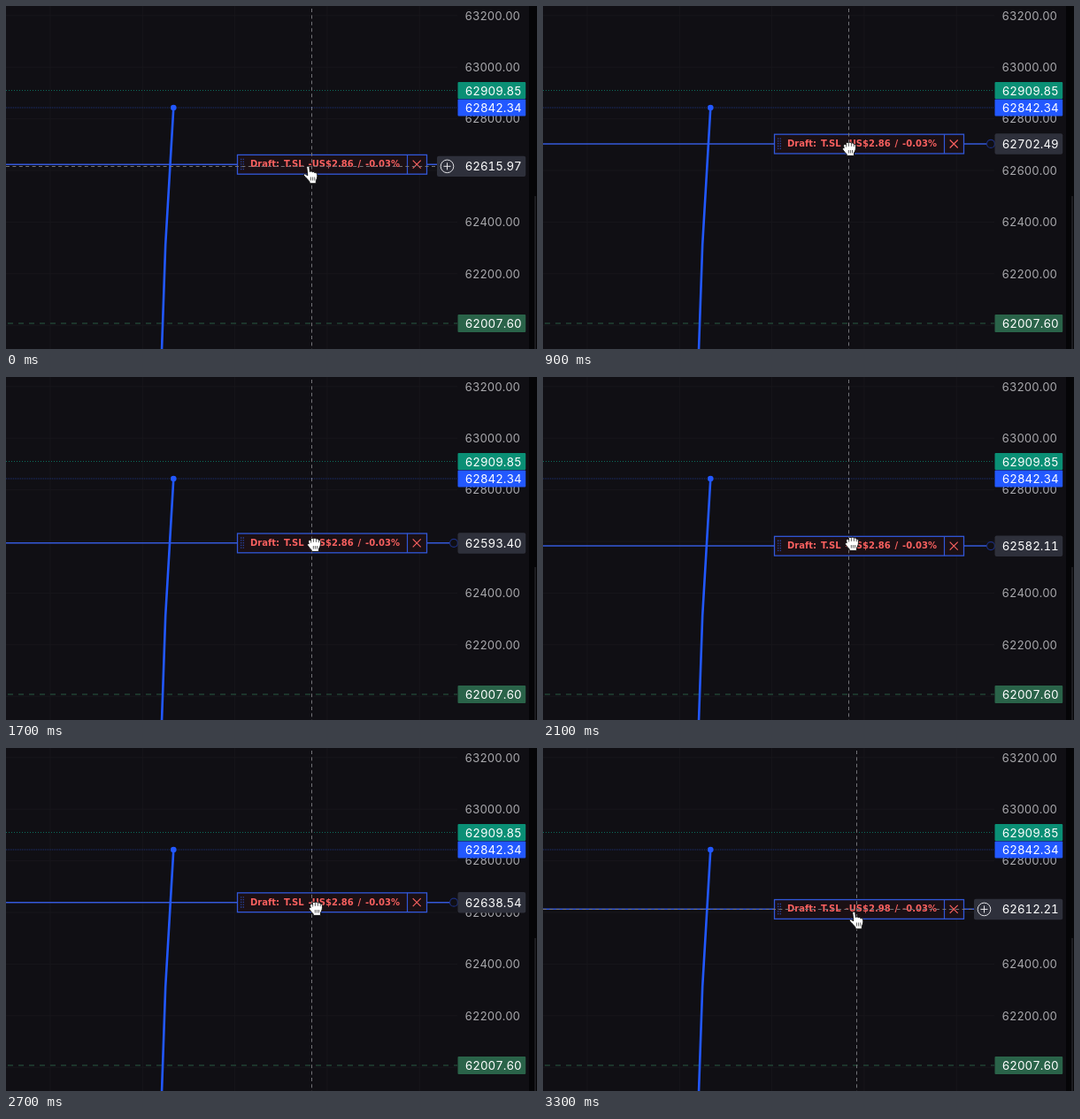
Recreate the animation shown at these times as an HTML page. Size 600x388 px, loop 3.4 s.

```html
<!DOCTYPE html>
<html lang="en">
<head>
<meta charset="utf-8">
<title>Dragging a draft stop order</title>
<style>
  html, body { margin: 0; width: 100%; height: 100%; overflow: hidden; background: #100f14; }
  svg { display: block; width: 600px; height: 388px; }
  text { font: 13.3px Inter, Roboto, sans-serif; font-variant-numeric: tabular-nums; text-anchor: middle; fill: #fff; }
  .tick { font-size: 13px; fill: #a9a9ad; }
  .grid { stroke: #17161b; }
  .order { font: bold 10px "DejaVu Sans", sans-serif; word-spacing: 1.4px; text-anchor: start; fill: #f8605f; }
  .cross { stroke: #737378; stroke-dasharray: 4 3.4; }
  .cursor { fill: #fff; stroke: #111; stroke-width: 1; stroke-linejoin: round; }
  .slits { fill: none; stroke: #333; stroke-width: .8; }
</style>
</head>
<body>
<svg viewBox="0 0 600 388">
  <rect width="600" height="388" fill="#100f14"/>
  <g id="scale"></g>

  <path d="M0 95.5H510" stroke="#0c6c5d" stroke-dasharray="1 2"/>
  <path d="M0 115H510" stroke="#1d327a" stroke-dasharray="1 1"/>
  <path d="M2 359H510" stroke="#285a42" stroke-dasharray="6 6"/>

  <g id="draft">
    <path d="M0 0H501" stroke="#3559da" stroke-width="1.5"/>
    <circle id="knob" cx="506" r="4.5" fill="#100f14" stroke="#1c2f80" stroke-width="1.2"/>
    <rect x="261.5" y="-10.8" width="214" height="21.8" fill="#1b1015" stroke="#3157d8" stroke-width="1.3"/>
    <path d="M453.5 -11V11" stroke="#3157d8" stroke-width="1.2"/>
    <path d="M265.7 -6.5V7M268.3 -6.5V7" stroke="#2a49b0" stroke-width="1.2" stroke-dasharray="1.3 1.5"/>
    <text class="order" id="order" x="276" y="3"></text>
    <path d="M459.7 -4.5l9 9m0 -9l-9 9" stroke="#f8605f" stroke-width="1.2"/>
  </g>

  <path d="M189.3 115L180.2 270L176 390" fill="none" stroke="#2258ff" stroke-width="2.6"/>
  <circle cx="189.3" cy="115" r="3.3" fill="#2258ff"/>

  <path class="cross" id="crossX" d="M0 3V388"/>
  <path class="cross" id="crossY" d="M0 0H487"/>

  <rect x="591" width="9" height="388" fill="#050507"/>
  <rect x="597" y="215" width="2" height="173" fill="#1b1b1f"/>
  <rect x="510.5" y="86" width="76.7" height="19" rx="1" fill="#0a8f75"/>
  <text x="550.7" y="100.5">62909.85</text>
  <rect x="510.5" y="105.5" width="76.7" height="19" rx="1" fill="#2258ff"/>
  <text x="550.7" y="120">62842.34</text>
  <rect x="510.5" y="349" width="76.7" height="20" rx="1" fill="#2a6349"/>
  <text x="550.7" y="364">62007.60</text>

  <g id="tag">
    <rect id="tagBox" y="-11.7" height="23.4" rx="2" fill="#2e303b"/>
    <g id="plus" fill="none" stroke="#e4e4e8">
      <circle cx="498.5" r="7.3"/>
      <path d="M494.5 0h8M498.5 -4v8"/>
    </g>
    <text id="price" x="550.7" y="5"></text>
  </g>

  <g class="cursor" id="hand">
    <path d="M4 1.8C4 .3 6.8 .2 7 1.8L7.6 7C8.5 6 10 6.2 10.4 7.4C11.5 6.6 12.8 7 13 8.2C14.2 7.8 15.6 8.4 15.8 9.8C16.4 12.5 15.8 14.5 14.6 17L14.4 20.3H7.6L7 18C5 16 3.5 13.8 1 11.6C0 10.4 1 9 2.4 9.6L5 11.2Z"/>
    <path class="slits" d="M8.6 13v4M10.8 13v4M13 13v4"/>
  </g>
  <g class="cursor" id="fist">
    <path d="M1.6 5C1.6 3 4 2.8 4.6 4L4.4 2.6C4.6 1 7 .8 7.4 2.2C7.8 .6 10.2 .7 10.4 2.4C11 1.4 13 1.8 13.2 3.4C14 3 15.4 3.6 15.4 5.2C15.6 9 15.2 10.5 13.6 13L13.4 16.4H5.4L5 14.6C3.4 13 2 11.4 .8 9.4C0 8 1.2 7.2 2.2 7.8Z"/>
    <path class="slits" d="M4.6 4v2.5M7.4 2.4v3.4M10.4 2.6v3.2M13.2 3.6v2.6M7.3 10v3.5M9.4 10v3.5M11.5 10v3.5"/>
  </g>
</svg>
<script>
  const LOOP = 3400, STEP = 100, GRAB = 200, DROP = 3100;
  const $ = id => document.getElementById(id);
  const yOf = price => 127.6 + (62800 - price) * 0.292;
  const priceAt = tick => 62612.2085 + tick * 3.7618;

  // [time, value] points
  const ticks = [[0, 1], [200, 2], [500, 16], [900, 24], [1300, 4], [2100, -8], [2700, 7], [3000, 0], [3400, 0]];
  const handX = [[0, 345], [500, 345.5], [900, 346], [1300, 347], [2100, 349], [2700, 350], [3300, 355], [3400, 355]];
  const handY = [[0, 188], [200, 186], [500, 166], [900, 161], [1300, 185], [2100, 188], [2700, 181], [3000, 190], [3300, 192], [3400, 192]];

  // Smooth curve through the points
  function sample(keys, t) {
    let i = 0;
    while (i < keys.length - 2 && t >= keys[i + 1][0]) i++;
    const slope = k => {
      const a = keys[Math.max(k - 1, 0)], b = keys[Math.min(k + 1, keys.length - 1)];
      return (b[1] - a[1]) / (b[0] - a[0]);
    };
    const [t0, v0] = keys[i], [t1, v1] = keys[i + 1];
    const d = t1 - t0, u = (t - t0) / d, w = 1 - u;
    return v0 * w * w * (1 + 2 * u) + v1 * u * u * (3 - 2 * u)
      + d * u * w * (slope(i) * w - slope(i + 1) * u);
  }

  let scale = '';
  for (let x = 50; x < 510; x += 104.3) scale += `<path class="grid" d="M${x} 0V388"/>`;
  for (let p = 63200; p >= 62000; p -= 200) {
    const y = yOf(p);
    scale += `<path class="grid" d="M0 ${y}H510"/>`;
    if (p > 62000) scale += `<text class="tick" x="549.8" y="${y + 4.8}">${p}.00</text>`;
  }
  $('scale').innerHTML = scale;

  const move = (id, x, y) => $(id).setAttribute('transform', `translate(${x} ${y})`);
  const show = (id, on) => $(id).setAttribute('visibility', on ? 'visible' : 'hidden');

  function draw(now) {
    const t = Math.floor(now % LOOP / STEP) * STEP;
    const drag = t >= GRAB && t < DROP;
    const tick = Math.round(sample(ticks, t));
    const price = priceAt(tick), y = yOf(price);
    const x = sample(handX, t), cy = sample(handY, t);

    move('draft', 0, t < GRAB ? 179.2 : y - 0.1);
    move('tag', 0, y);
    move('crossX', drag ? 345.5 : Math.round(x) + (t < GRAB ? 0.5 : -0.5), 0);
    move('crossY', 0, Math.floor(y) + 0.5);
    move('hand', x - 9.2, cy - 7.5);
    move('fist', x - 8, cy - 8);

    ['fist', 'knob'].forEach(id => show(id, drag));
    ['hand', 'plus', 'crossY'].forEach(id => show(id, !drag));
    $('tagBox').setAttribute('x', drag ? 510.5 : 487);
    $('tagBox').setAttribute('width', drag ? 76.7 : 100.2);
    $('price').textContent = price.toFixed(2);
    $('order').textContent = `Draft: T.SL -US$${t < DROP ? '2.86' : '2.98'} / -0.03%`;
  }

  const start = performance.now();
  function loop() {
    draw(performance.now() - start);
    requestAnimationFrame(loop);
  }
  loop();
</script>
</body>
</html>
```
